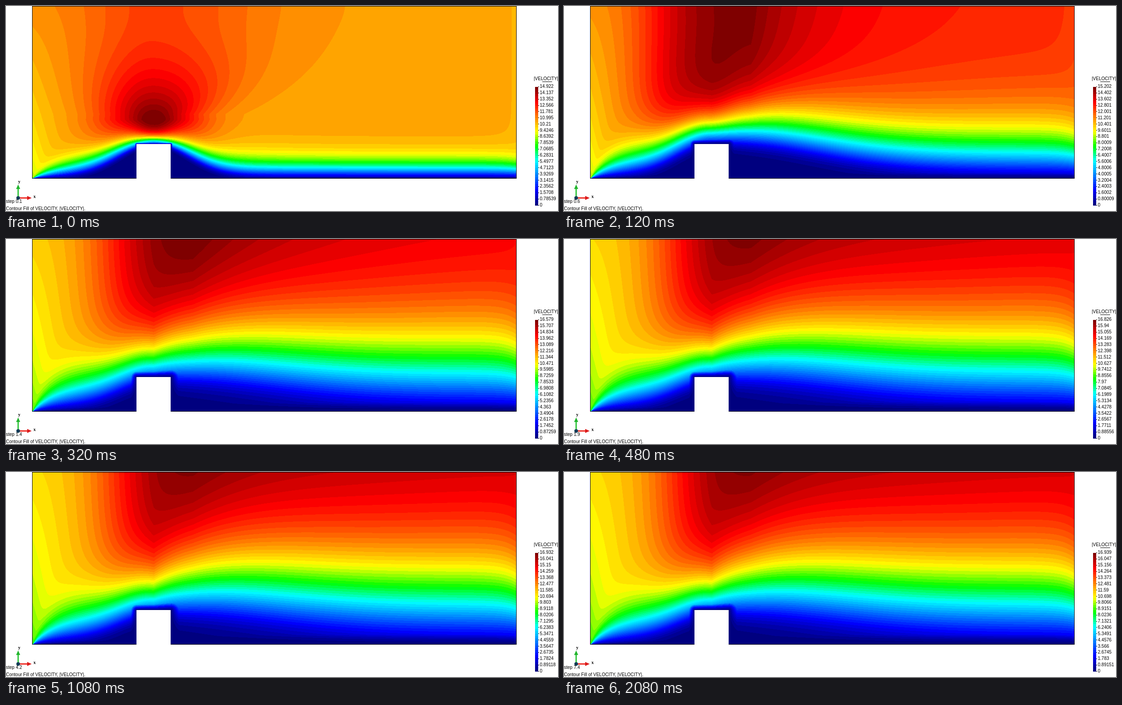
Animation of 1227x456 px, one loop 2120 ms. Source, as an HTML page with a canvas:

```html
<!DOCTYPE html>
<html lang="en">
<head>
<meta charset="utf-8">
<title>Velocity contour fill</title>
<style>
html, body { margin: 0; width: 100%; height: 100%; overflow: hidden; background: #fff; }
canvas { display: block; width: 1227px; height: 456px; }
</style>
</head>
<body>
<canvas id="stage" width="1227" height="456"></canvas>
<script>
const ctx = document.getElementById('stage').getContext('2d');
const LEFT = 59, RIGHT = 1134, FLOOR = 383;
const BOX = { left: 290, right: 366, top: 307, mid: 328 };
const BANDS = 50, LABELS = 20, FRAME = 40, FRAMES = 53;
const FONT = '"Liberation Sans", Arial, sans-serif';

// Flow at four stages, speeds relative to the maximum:
//   peak, mid, width   fastest core and where the flow speeds up towards it
//   drift, run         loss of core speed downstream and its length
//   lift, wake         height of the slow zone at the box and length of its wake
//   grow, thick        wall layer before the box, and what it gains after it
//   pinch              thinning of the wall layer over the box
//   crest, blob        extra speed above the box, at the top and near the box
const STAGES = [
  { peak: 0.715, mid: 250, width: 57, drift: 0, run: 300, lift: 74, wake: 75,
    grow: 55, thick: -14, pinch: 0.55, crest: 0.09, blob: 0.2 },
  { peak: 1, mid: 205, width: 48, drift: 0.17, run: 180, lift: 72, wake: 220,
    grow: 95, thick: 24, pinch: 0.12, crest: 0, blob: 0.1 },
  { peak: 1.045, mid: 243, width: 57, drift: 0.15, run: 280, lift: 57, wake: 245,
    grow: 112, thick: 84, pinch: 0, crest: 0, blob: 0 },
  { peak: 1.04, mid: 250, width: 57, drift: 0.085, run: 300, lift: 55, wake: 250,
    grow: 112, thick: 110, pinch: 0, crest: 0, blob: 0 }
];
const INLET_SPEED = 10.85;

// Key moments: frame, step counter, legend increment, position among the stages.
const KEYS = [
  [0, 0.1, 0.785386, 0],
  [3, 0.6, 0.800092, 1],
  [8, 1.4, 0.872594, 2],
  [12, 1.9, 0.88556, 2.69],
  [19, 2.9, 0.890924, 2.97],
  [37, 5.9, 0.891506, 3],
  [52, 7.4, 0.89151, 3]
];

const mix = (a, b, t) => a + (b - a) * t;
const bell = d => Math.exp(-d * d);
const settle = d => d > 0 ? 1 - Math.exp(-d) : 0;

function momentAt(frame) {
  const k = Math.max(1, KEYS.findIndex(key => key[0] >= frame));
  const a = KEYS[k - 1], b = KEYS[k], t = (frame - a[0]) / (b[0] - a[0]);
  const [, step, unit, stage] = a.map((v, i) => mix(v, b[i], t));
  return { step, unit, stage };
}

function flowAt(stage) {
  const k = Math.min(Math.floor(stage), STAGES.length - 2);
  const a = STAGES[k], b = STAGES[k + 1], flow = {};
  for (const name in a) flow[name] = mix(a[name], b[name], stage - k);
  return flow;
}

const STOPS = [
  [0, 0, 0, 127], [0.125, 0, 0, 255], [0.375, 0, 255, 255], [0.5, 0, 255, 0],
  [0.625, 255, 255, 0], [0.875, 255, 0, 0], [1, 127, 0, 0]
];
const PALETTE = Array.from({ length: BANDS }, (_, i) => {
  const t = i / (BANDS - 1);
  const k = Math.max(1, STOPS.findIndex(s => s[0] >= t));
  const a = STOPS[k - 1], b = STOPS[k], f = (t - a[0]) / (b[0] - a[0]);
  return [1, 2, 3].map(c => Math.round(mix(a[c], b[c], f)));
});
const PACKED = PALETTE.map(([r, g, b]) => (255 << 24 | b << 16 | g << 8 | r) >>> 0);

const W = RIGHT - LEFT, H = FLOOR + 1;
const image = ctx.createImageData(W, H);
const pixels = new Uint32Array(image.data.buffer);

// Inlet speed falls slightly towards the floor.
const ROWS = Array.from({ length: H }, (_, y) => {
  const r = y / FLOOR, near = Math.min(1, (y / 240) ** 1.6);
  return {
    drop: 0.135 * r + 0.06 * r ** 6,
    rise: Math.min(1.1, (y / 243) ** 2.4),
    reachLeft: mix(161, 113, near),
    reachRight: mix(250, 105, near)
  };
});

function columnAt(x, flow, inlet) {
  const dx = x - BOX.mid, outlet = Math.exp((x - RIGHT) / 30);
  const ramp = 1 / (1 + Math.exp((flow.mid - x) / flow.width));
  const core = mix(inlet, flow.peak, ramp) - flow.drift * settle((x - 415) / flow.run);
  const spread = (dx < 0 ? 75 : flow.wake) * Math.SQRT2;
  const layer = flow.grow * settle((x - LEFT) / 80) + flow.thick * settle(dx / 130);
  return {
    dx,
    core: core * (1 - 0.03 * outlet),
    base: FLOOR - flow.lift * bell(dx / spread),
    depth: Math.max(1, layer * (1 - flow.pinch * bell(dx / 60)) * (1 - 0.15 * outlet)),
    entry: Math.exp((LEFT - x) / 65),
    side: Math.max(BOX.left - x, 0, x - BOX.right)
  };
}

function speedAt(col, y, flow) {
  const row = ROWS[y], soft = col.depth * 0.1;
  const extra = flow.crest + flow.blob * row.rise;
  let core = col.core * (1 - row.drop * col.entry);
  if (extra > 0) core += extra * bell(col.dx / (col.dx < 0 ? row.reachLeft : row.reachRight));
  const d = (col.base - y) / soft;
  const height = d > 8 ? d * soft : soft * Math.log1p(Math.exp(d));
  const gap = Math.hypot(col.side, Math.max(BOX.top - y, 0));
  const fade = Math.min(1, (FLOOR - y) / soft, gap / (1.2 * soft));
  return core * Math.tanh(height / col.depth) * fade;
}

function drawField(flow, inlet) {
  for (let x = 0; x < W; x++) {
    const col = columnAt(x + LEFT, flow, inlet);
    for (let y = 0; y < H; y++) {
      const band = Math.floor(speedAt(col, y, flow) * BANDS);
      pixels[y * W + x] = PACKED[Math.max(0, Math.min(BANDS - 1, band))];
    }
  }
  ctx.putImageData(image, LEFT, 0);
  ctx.strokeStyle = '#000';
  ctx.lineWidth = 1;
  ctx.strokeRect(LEFT - 0.5, 0.5, W + 1, H - 1);
  rect('#fff', BOX.left, BOX.top, BOX.right - BOX.left, H - BOX.top);
}

function rect(color, x, y, w, h) {
  ctx.fillStyle = color;
  ctx.fillRect(x, y, w, h);
}

function text(str, x, y, font = '10px ' + FONT) {
  ctx.font = font;
  ctx.fillStyle = '#000';
  ctx.fillText(str, x, y);
}

function drawLegend(unit) {
  text('|VELOCITY|', 1173, 165);
  rect('#000', 1192, 168, 22, 1);
  const top = 180, size = 264 / BANDS;
  PALETTE.forEach((c, i) => {
    const y = Math.round(top + (BANDS - 1 - i) * size);
    rect(`rgb(${c})`, 1176, y, 7, Math.round(top + (BANDS - i) * size) - y);
  });
  for (let i = 0; i < LABELS; i++) {
    const y = 442.5 - i * 13.87;
    rect('#000', 1183, Math.round(y), 2, 1);
    text(String(Number((unit * i).toPrecision(5))), 1186.5, Math.round(y + 3.5));
  }
}

function arrow(angle, shaft, head) {
  ctx.save();
  ctx.translate(27, 427);
  ctx.rotate(angle);
  rect(shaft, 0, -1.5, 22, 3);
  ctx.fillStyle = head;
  ctx.beginPath();
  ctx.moveTo(30, 0);
  ctx.lineTo(20, -4.5);
  ctx.lineTo(20, 4.5);
  ctx.fill();
  ctx.restore();
}

function drawAxes() {
  arrow(-Math.PI / 2, '#2fc43a', '#22b52e');
  arrow(0, '#ee2a22', '#dc1c1c');
  ctx.fillStyle = '#123c58';
  ctx.beginPath();
  ctx.arc(27, 427, 4, 0, 7);
  ctx.fill();
  const serif = 'bold 10px "Liberation Serif", Times, serif';
  text('x', 61, 427, serif);
  text('y', 27, 394, serif);
}

function draw(frame) {
  const { step, unit, stage } = momentAt(frame);
  rect('#fff', 0, 0, 1227, 456);
  drawField(flowAt(stage), INLET_SPEED / (unit * (LABELS - 1)));
  drawLegend(unit);
  drawAxes();
  text('step ' + step.toFixed(1), 0, 438);
  text('Contour Fill of VELOCITY, |VELOCITY|.', 0, 454);
}

let shown = -1;
function tick() {
  const frame = Math.floor(performance.now() / FRAME) % FRAMES;
  if (frame !== shown) draw(shown = frame);
  requestAnimationFrame(tick);
}
tick();
</script>
</body>
</html>
```
